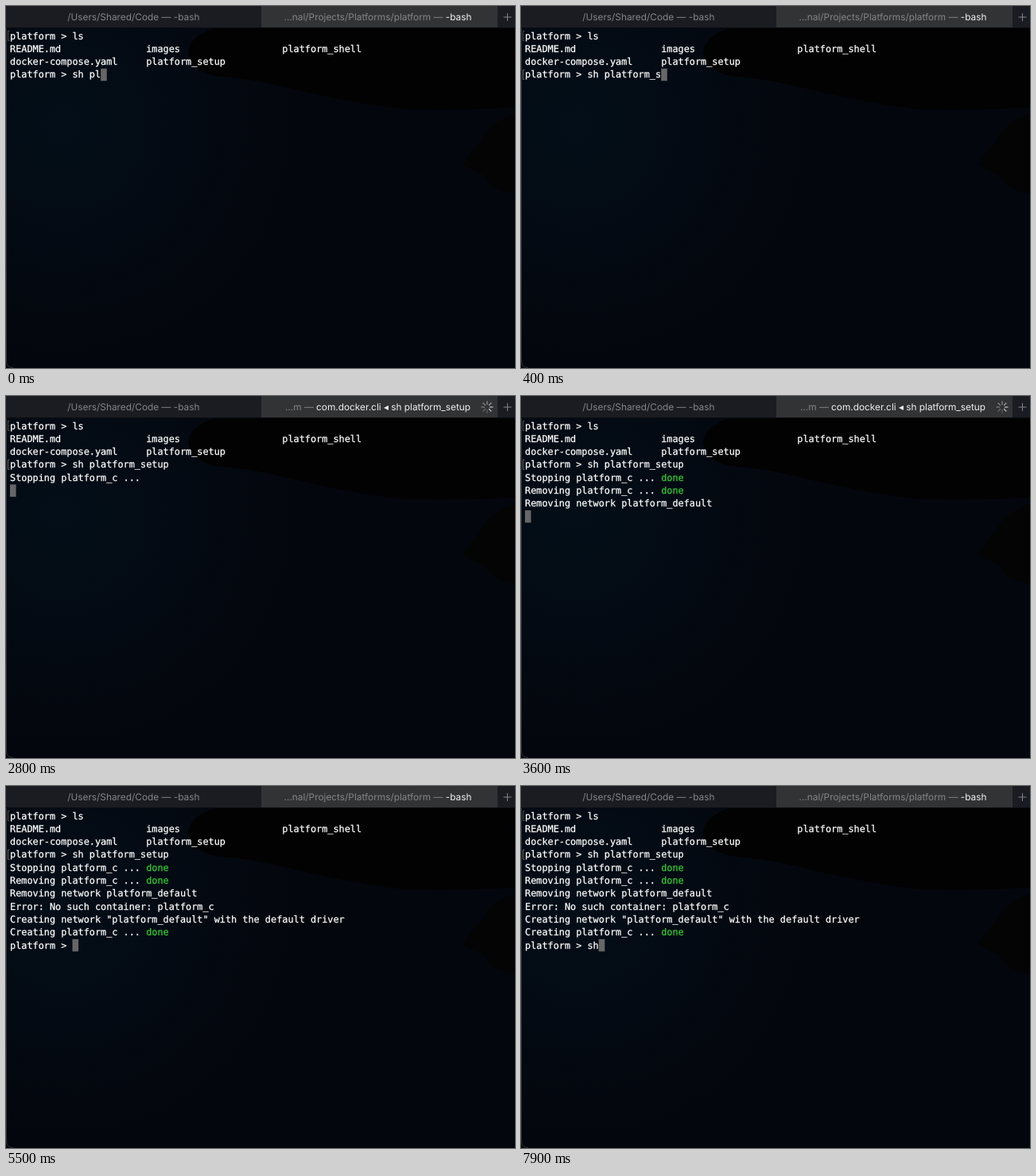
An HTML page that plays this animation: 640x456 px, repeating every 8 s.

```html
<!DOCTYPE html>
<html lang="en">
<head>
<meta charset="utf-8">
<title>Terminal session</title>
<style>
  html, body { margin: 0; width: 100%; height: 100%; overflow: hidden; background: #04060c; }
  svg { display: block; width: 640px; height: 456px; }
  text { text-rendering: geometricPrecision; white-space: pre; }
  .mono { font: 11.85px "DejaVu Sans Mono", monospace; fill: #fff; stroke: #fff; stroke-width: .25px; }
  .ok { fill: #33cc33; stroke: #33cc33; }
  .tab { font: 11.85px Inter, sans-serif; text-anchor: middle; fill: #858588; }
  .live { fill: #f0f0f0; }
</style>
</head>
<body>
<svg viewBox="0 0 640 456">
  <defs>
    <radialGradient id="glow" gradientUnits="userSpaceOnUse" cx="70" cy="150" r="300">
      <stop offset="0" stop-color="#030e18"/>
      <stop offset="1" stop-color="#030e18" stop-opacity="0"/>
    </radialGradient>
    <radialGradient id="bellGlow" gradientUnits="userSpaceOnUse" cx="80" cy="140" r="280">
      <stop offset="0" stop-color="#212d32"/>
      <stop offset=".5" stop-color="#232d31"/>
      <stop offset="1" stop-color="#2c2d2f" stop-opacity="0"/>
    </radialGradient>
    <path id="hills" d="M262 28Q226 40 230 62Q232 80 262 88Q310 92 350 102Q430 122 500 130Q560 132 640 128V28Z"/>
    <path id="rock" d="M574 200Q588 178 596 172Q608 146 640 136V236Q612 234 602 214Z"/>
  </defs>

  <rect width="640" height="456" fill="#04060d"/>
  <rect width="640" height="456" fill="url(#glow)"/>
  <use href="#hills" fill="#020203"/>
  <use href="#rock" fill="#040405"/>

  <g id="bell">
    <rect width="640" height="456" fill="#2c2d2f"/>
    <rect width="640" height="456" fill="url(#bellGlow)"/>
    <use href="#hills" fill="#282828"/>
    <use href="#rock" fill="#2a2a2a"/>
  </g>
  <path d="M.5 28V447Q.5 455.5 9 455.5" fill="none" stroke="#303033"/>

  <rect width="640" height="27" fill="#1a1c22"/>
  <rect x="321" width="297" height="27" fill="#323335"/>
  <path d="M0 27.5H640" stroke="#0c0c0e"/>
  <path d="M625.5 14H635.5M630.5 9V19" stroke="#858588"/>
  <text class="tab" x="160.3" y="18">/Users/Shared/Code — -bash</text>
  <text class="tab" x="467.5" y="18"><tspan id="path"></tspan><tspan id="job" class="live"></tspan></text>
  <g id="spinner" stroke="#b4b4b6" stroke-width="1.3" stroke-linecap="round"></g>

  <g fill="none" stroke="#66666a">
    <path d="M4.5 31.5H2.5V43.5H4.5" opacity=".7"/>
    <path id="mark" d="M4.5 80.5H2.5V92.5H4.5"/>
  </g>
  <rect id="cursor" width="7.6" height="15.5" fill="#666"/>
  <g id="screen"></g>
</svg>

<script>
const LOOP = 8000, LEFT = 5, COL = 7.134, BASE = 41.5, ROW = 16.3;
const $ = id => document.getElementById(id);
const NS = "http://www.w3.org/2000/svg";

const START = [
  "platform > ls",
  "README.md               images                  platform_shell",
  "docker-compose.yaml     platform_setup",
  "platform > sh pl"
].join("\n");

// Output by time; "\b" returns to the end of the previous line.
const OUTPUT = [
  [100, "atform_s"],
  [1100, "e"],
  [1500, "tup "],
  [2100, "\n"],
  [2600, "Stopping platform_c ... \n"],
  [3100, "\bdone\n"],
  [3200, "Removing platform_c ... \n"],
  [3300, "\bdone\n"],
  [3400, "Removing network platform_default\n"],
  [3800, "Error: No such container: platform_c\n"],
  [4200, 'Creating network "platform_default" with the default driver\n'],
  [4400, "Creating platform_c ... \n"],
  [5100, "\bdone\n"],
  [5500, "platform > "],
  [7500, "s"],
  [7700, "h"]
];

const SHELL = ["…nal/Projects/Platforms/platform — ", "-bash"];
const SCRIPT = ["…ects/Platforms/platform — ", "sh platform_setup"];
const TITLES = [
  [0, SHELL],
  [2200, SCRIPT],
  [2600, ["…m — ", "com.docker.cli ◂ sh platform_setup"]],
  [5300, SCRIPT],
  [5500, SHELL]
];

function add(parent, tag, attrs) {
  const el = document.createElementNS(NS, tag);
  for (const k in attrs) el.setAttribute(k, attrs[k]);
  return parent.appendChild(el);
}

const show = (id, on) => $(id).style.display = on ? "" : "none";

const rows = Array.from({ length: 12 }, (_, i) => {
  const y = BASE + i * ROW;
  return {
    plain: add($("screen"), "text", { class: "mono", x: LEFT, y }),
    ok: add($("screen"), "text", { class: "mono ok", x: LEFT + 24 * COL, y })
  };
});

const spokes = Array.from({ length: 8 }, (_, i) =>
  add($("spinner"), "path", { d: "M605 10.5V7", transform: `rotate(${i * 45} 605 14)` }));

function drawScreen(t) {
  const typed = OUTPUT.filter(([at]) => at <= t).map(([, s]) => s).join("");
  const lines = (START + typed).replace(/\n\x08/g, "").split("\n");
  rows.forEach(({ plain, ok }, i) => {
    const line = lines[i] || "", done = line.endsWith(" done");
    plain.textContent = done ? line.slice(0, -4) : line;
    ok.textContent = done ? "done" : "";
  });
  const last = lines.length - 1;
  $("cursor").setAttribute("x", LEFT + lines[last].length * COL);
  $("cursor").setAttribute("y", BASE + last * ROW - 11.6);
}

function drawTitle(t) {
  const [path, job] = TITLES.filter(([at]) => at <= t).pop()[1];
  $("path").textContent = path;
  $("job").textContent = job;
}

function draw(tick) {
  const t = tick * 100;
  drawScreen(t);
  drawTitle(t);
  show("bell", t >= 100 && t < 300);
  show("mark", t >= 100);
  show("spinner", t >= 2600 && t < 5500);
  spokes.forEach((s, i) => s.setAttribute("opacity", 0.3 + 0.7 * ((i - tick + 80) % 8) / 7));
}

const begin = performance.now();
let shown = -1;
function frame() {
  const tick = Math.floor((performance.now() - begin) % LOOP / 100);
  if (tick !== shown) draw(shown = tick);
  requestAnimationFrame(frame);
}
frame();
</script>
</body>
</html>
```
